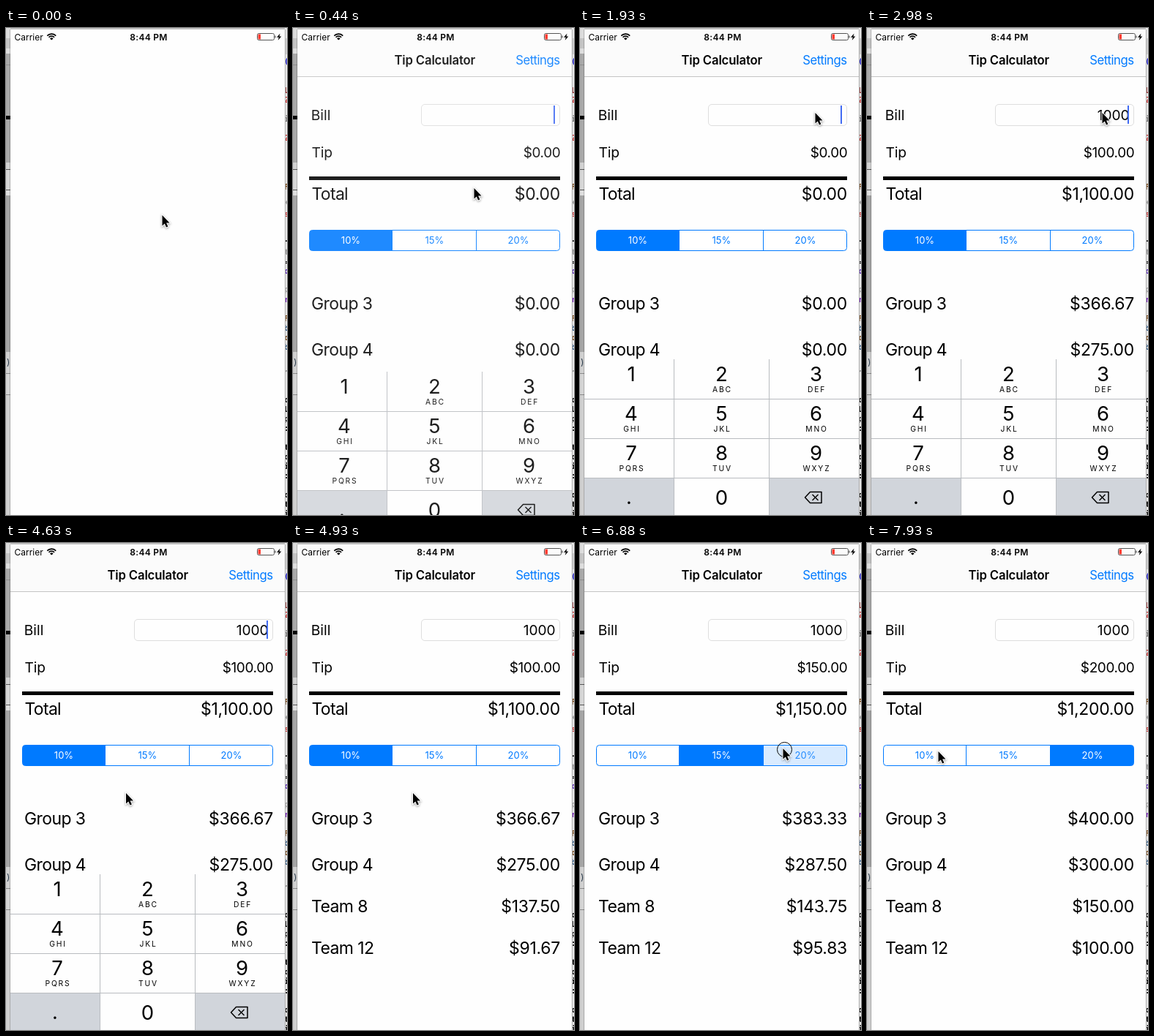
Write an HTML page with a canvas that moves like this. It is 384x666 px and loops after 8 s.

```html
<!DOCTYPE html>
<html lang="en">
<head>
<meta charset="utf-8">
<title>Tip Calculator</title>
<style>
html, body { margin: 0; width: 100%; height: 100%; overflow: hidden; background: #fff; }
canvas { display: block; width: 384px; height: 666px; }
</style>
</head>
<body>
<canvas id="stage"></canvas>
<script>
const W = 384, H = 666, LOOP = 8000;
const BLUE = '#007aff', SANS = 'Inter, "Open Sans", sans-serif';
const canvas = document.getElementById('stage');
const ctx = canvas.getContext('2d');
const ratio = window.devicePixelRatio || 1;
canvas.width = W * ratio;
canvas.height = H * ratio;

// Pointer path: time, x, y
const POINTER = [
  [0, 213, 256], [140, 215, 254], [440, 247, 219], [740, 285, 170], [1190, 322, 121],
  [1340, 322, 121], [1480, 321, 116], [3280, 321, 116], [4180, 163.5, 342],
  [5830, 163.5, 342], [5980, 170, 286], [6130, 170, 286], [6730, 277, 281],
  [7030, 277, 281], [7930, 97, 285]
];
const KEYBOARD = [[0, 216], [140, 195], [290, 85], [440, 17], [590, 0], [4630, 0], [4780, 105], [4930, 216]];
const COVER = [[0, 1], [140, 0.95], [290, 0.5], [440, 0.12], [590, 0]];
const SHARES = [['Group 3', 3, 385], ['Group 4', 4, 448], ['Team 8', 8, 505], ['Team 12', 12, 562]];
const KEYS = ['', 'ABC', 'DEF', 'GHI', 'JKL', 'MNO', 'PQRS', 'TUV', 'WXYZ'];

const within = (t, a, b) => t >= a && t < b;

// The screen refreshes in steps of 150 ms.
function snap(t) {
  if (t < 140) return 0;
  const base = t < 1480 ? 140 : 1480;
  return base + 150 * Math.floor((t - base) / 150);
}

function track(keys, t) {
  const i = keys.findIndex(k => k[0] > t);
  if (i < 0) return keys[keys.length - 1].slice(1);
  const a = keys[i - 1], b = keys[i];
  const u = (t - a[0]) / (b[0] - a[0]), e = u * u * (3 - 2 * u);
  return a.slice(1).map((v, n) => v + (b[n + 1] - v) * e);
}

function text(str, x, y, size, { align = 'left', color = '#000', weight = 400, gap = 0, family = SANS } = {}) {
  ctx.font = `${weight} ${size}px ${family}`;
  ctx.letterSpacing = gap + 'px';
  ctx.textAlign = align;
  ctx.fillStyle = color;
  ctx.fillText(str, x, y);
}

function rect(x, y, w, h, color) {
  ctx.fillStyle = color;
  ctx.fillRect(x, y, w, h);
}

function poly(points, fill, close = true) {
  ctx.beginPath();
  points.forEach(([x, y]) => ctx.lineTo(x, y));
  if (close) ctx.closePath();
  if (fill) { ctx.fillStyle = fill; ctx.fill(); }
}

function roundBox(x, y, w, h, r) {
  ctx.beginPath();
  ctx.roundRect(x, y, w, h, r);
}

const money = v => '$' + v.toLocaleString('en-US', { minimumFractionDigits: 2, maximumFractionDigits: 2 });

function drawDesktop() {
  rect(0, 0, W, H, '#e6e6e6');
  const bands = [
    [0, 14, '#dcdcdc'], [14, 14, '#c4c4c4'], [28, 7, '#dedede'], [35, 149, '#a9a9a9'], [50, 1, '#8d8d8d'],
    [120, 5, '#000'], [184, 9, '#d2d2d2'], [193, 1, '#555'], [194, 27, '#d6d6d6'], [221, 1, '#555'],
    [222, 7, '#dedede'], [229, 214, '#a5a5a5'], [443, 29, '#d0d0d0'], [472, 1, '#8a8a8a'],
    [473, 28, '#d4d4d4'], [501, 1, '#8a8a8a'], [502, 164, '#cfcfcf']
  ];
  bands.forEach(([y, h, color]) => rect(0, y, 6, h, color));
  text(')', 1, 461, 12, { color: '#234' });
  rect(5, 2, 1, H, 'rgba(0,0,0,.18)');
  rect(381, 0, 3, H, '#ececec');
  rect(381, 14, 3, 22, '#d2d2d2');
  const mono = '"DejaVu Sans Mono", monospace';
  const code = [
    ['(', 49, '#22c'], ['L', 89, '#933'], ['2', 102, '#c33'], ['i', 128, '#777'], ['2', 154, '#c33'],
    ['F', 221, '#741'], ['*', 244, '#999'], ['s', 258, '#c33'], ['-', 294, '#000'], ['t', 310, '#999'],
    ['=', 324, '#222'], ['c', 336, '#52b'], ['p', 361, '#999'], ['r', 375, '#72b'], ['F', 401, '#741'],
    ['b', 414, '#147'], ['c', 427, '#741'], ['b', 440, '#147'], ['^', 476, '#999']
  ];
  code.forEach(([s, y, color]) => text(s, 380, y, 11, { color, weight: 700, family: mono }));
  [...'cLp:'].forEach((s, i) => text(s, 380, 512 + 13 * i, 11, { weight: 700, family: mono }));
  [...'tci:'].forEach((s, i) => text(s, 380, 577 + 13 * i, 11, { weight: 700, family: mono }));
  [...'cti'].forEach((s, i) => text(s, 380, 642 + 13 * i, 11, { weight: 700, family: mono }));
  rect(6, 0, 375, 2, '#c2c2c2');
  rect(6, 2, 375, H, '#fefefe');
  rect(381, 2, 1, H, '#aaa');
}

function drawStatus() {
  text('Carrier', 11.5, 16.8, 12);
  text('8:44 PM', 195, 16.8, 12, { align: 'center', weight: 600, gap: 0.3 });
  ctx.strokeStyle = '#000';
  ctx.lineWidth = 1.7;
  [8.2, 5.2].forEach(r => {
    ctx.beginPath();
    ctx.arc(62.3, 16.3, r, -Math.PI * 0.76, -Math.PI * 0.24);
    ctx.stroke();
  });
  ctx.beginPath();
  ctx.moveTo(62.3, 16.6);
  ctx.arc(62.3, 16.6, 3.1, -Math.PI * 0.76, -Math.PI * 0.24);
  ctx.fillStyle = '#000';
  ctx.fill();
  ctx.strokeStyle = '#555';
  ctx.lineWidth = 1;
  roundBox(343.5, 7.5, 23, 9, 2);
  ctx.stroke();
  rect(344.5, 8.5, 3.5, 7, '#ff3b30');
  rect(367.5, 10.5, 1.2, 3, '#555');
  poly([[374.5, 7.5], [370, 12.8], [372.8, 12.8], [371.8, 16.8], [376.3, 11.4], [373.5, 11.4]], '#000');
}

function drawSegments(levels) {
  ctx.save();
  roundBox(22.5, 276.5, 342, 28, 4);
  ctx.fillStyle = '#fff';
  ctx.fill();
  ctx.save();
  ctx.clip();
  [[22, 114], [136, 115], [251, 115]].forEach(([x, w], i) => {
    ctx.globalAlpha = levels[i];
    rect(x, 276, w, 29, BLUE);
  });
  ctx.restore();
  ctx.strokeStyle = BLUE;
  ctx.lineWidth = 1;
  ctx.stroke();
  rect(135, 277, 1, 28, BLUE);
  rect(250, 277, 1, 28, BLUE);
  [[79, '10%'], [193.3, '15%'], [308, '20%']].forEach(([x, label], i) => {
    const a = levels[i];
    ctx.globalAlpha = 1 - a;
    text(label, x, 295.3, 13, { align: 'center', color: BLUE });
    ctx.globalAlpha = a * a;
    text(label, x, 295.3, 13, { align: 'center', color: '#fff' });
  });
  ctx.restore();
}

function drawKeyboard(offset) {
  if (offset >= 216) return;
  ctx.save();
  ctx.translate(0, offset);
  rect(6, 453, 375, 216, '#fefefe');
  rect(6, 615, 122, 54, '#d1d5db');
  rect(259, 615, 122, 54, '#d1d5db');
  [507, 561, 615].forEach(y => rect(6, y, 375, 1, '#b9bcc0'));
  [128, 258].forEach(x => rect(x, 453, 1, 216, '#b9bcc0'));
  const centers = [70, 193.5, 322.5];
  KEYS.forEach((letters, i) => {
    const x = centers[i % 3], y = 54 * Math.floor(i / 3);
    text(String(i + 1), x, 483 + y, 27.5, { align: 'center' });
    text(letters, x + 1, 498 + y, 10.3, { align: 'center', gap: 1.8 });
  });
  text('0', 193.5, 652, 27.5, { align: 'center' });
  text('.', 67, 651, 27, { align: 'center' });
  ctx.strokeStyle = '#000';
  ctx.lineWidth = 1.5;
  ctx.lineJoin = 'round';
  poly([[307.5, 642], [314.5, 634.5], [330, 634.5], [330, 649.5], [314.5, 649.5]]);
  ctx.stroke();
  poly([[317.5, 638], [325.5, 646]], null, false);
  ctx.stroke();
  poly([[325.5, 638], [317.5, 646]], null, false);
  ctx.stroke();
  ctx.restore();
}

function drawApp(t) {
  const digits = [2380, 2530, 2680, 2980].filter(at => t >= at).length;
  const bill = digits ? 10 ** (digits - 1) : 0;
  const rate = t >= 7030 ? 0.2 : t >= 5980 ? 0.15 : 0.1;
  const total = bill * (1 + rate);
  const big = { align: 'right', gap: -0.3 };

  rect(6, 2, 375, 64, '#fbfbfb');
  rect(6, 66, 375, 1, '#c4c4c4');
  text('Tip Calculator', 193.7, 50, 16.7, { align: 'center', weight: 600, gap: -0.15 });
  text('Settings', 364.5, 50, 16.7, { align: 'right', color: BLUE, gap: -0.5 });

  text('Bill', 24.8, 125.5, 19.2);
  ctx.strokeStyle = '#dedede';
  ctx.lineWidth = 1;
  roundBox(175.5, 104.5, 189, 29, 4.5);
  ctx.stroke();
  if (bill) text(String(bill), 358.5, 125.5, 19.2, { align: 'right', gap: -0.1 });
  const blink = within(t, 1340, 1480) || within(t, 3580, 3880);
  if (t < 4780 && !blink) rect(356, 106, 2, 25, '#426bf2');

  text('Tip', 25.5, 176.5, 19.2, { gap: -0.2 });
  text(money(bill * rate), 365.3, 176.5, 19, { align: 'right', gap: -0.4 });
  rect(22, 203, 343, 5, '#000');
  text('Total', 25.5, 235.3, 23, { gap: -0.7 });
  text(money(total), 365, 235.3, 23, big);

  let levels = [1, 0, 0];
  if (t >= 5980) levels = [0.36, 0.7, 0];
  if (t >= 6130) levels = [0, 1, 0];
  if (t >= 6880) levels = [0, 1, 0.15];
  if (t >= 7030) levels = [0, 0.36, 0.7];
  if (t >= 7180) levels = [0, 0, 1];
  drawSegments(levels);

  SHARES.forEach(([label, people, y]) => {
    text(label, 25, y, 23, { gap: -0.6 });
    text(money(total / people), 365, y, 23, big);
  });
  drawKeyboard(track(KEYBOARD, t)[0]);
  rect(6, 2, 375, H, `rgba(254,254,254,${track(COVER, t)[0]})`);
}

function drawPointer(t) {
  const [x, y] = track(POINTER, t);
  const pressed = [1780, 4480, 5980, 6880].some(at => within(t, at, at + 150));
  ctx.save();
  ctx.translate(x, y);
  if (pressed) {
    ctx.beginPath();
    ctx.arc(2.5, 1.5, 10, 0, Math.PI * 2);
    ctx.strokeStyle = '#000';
    ctx.lineWidth = 1;
    ctx.stroke();
  }
  poly([[0.5, 0], [0.5, 14.5], [3.8, 11.4], [6, 16.6], [8.4, 15.6], [6.1, 10.6], [10.5, 10.6]]);
  ctx.shadowColor = 'rgba(0,0,0,.4)';
  ctx.shadowBlur = 3 * ratio;
  ctx.shadowOffsetY = ratio;
  ctx.strokeStyle = '#fff';
  ctx.lineWidth = 2;
  ctx.stroke();
  ctx.shadowColor = 'transparent';
  ctx.fillStyle = '#000';
  ctx.fill();
  ctx.restore();
}

function render(now) {
  const t = snap(now % LOOP);
  ctx.setTransform(ratio, 0, 0, ratio, 0, 0);
  drawDesktop();
  drawApp(t);
  drawStatus();
  drawPointer(t);
  requestAnimationFrame(render);
}

const start = performance.now();
render(0);
function loop() { render(performance.now() - start); }
</script>
</body>
</html>
```
